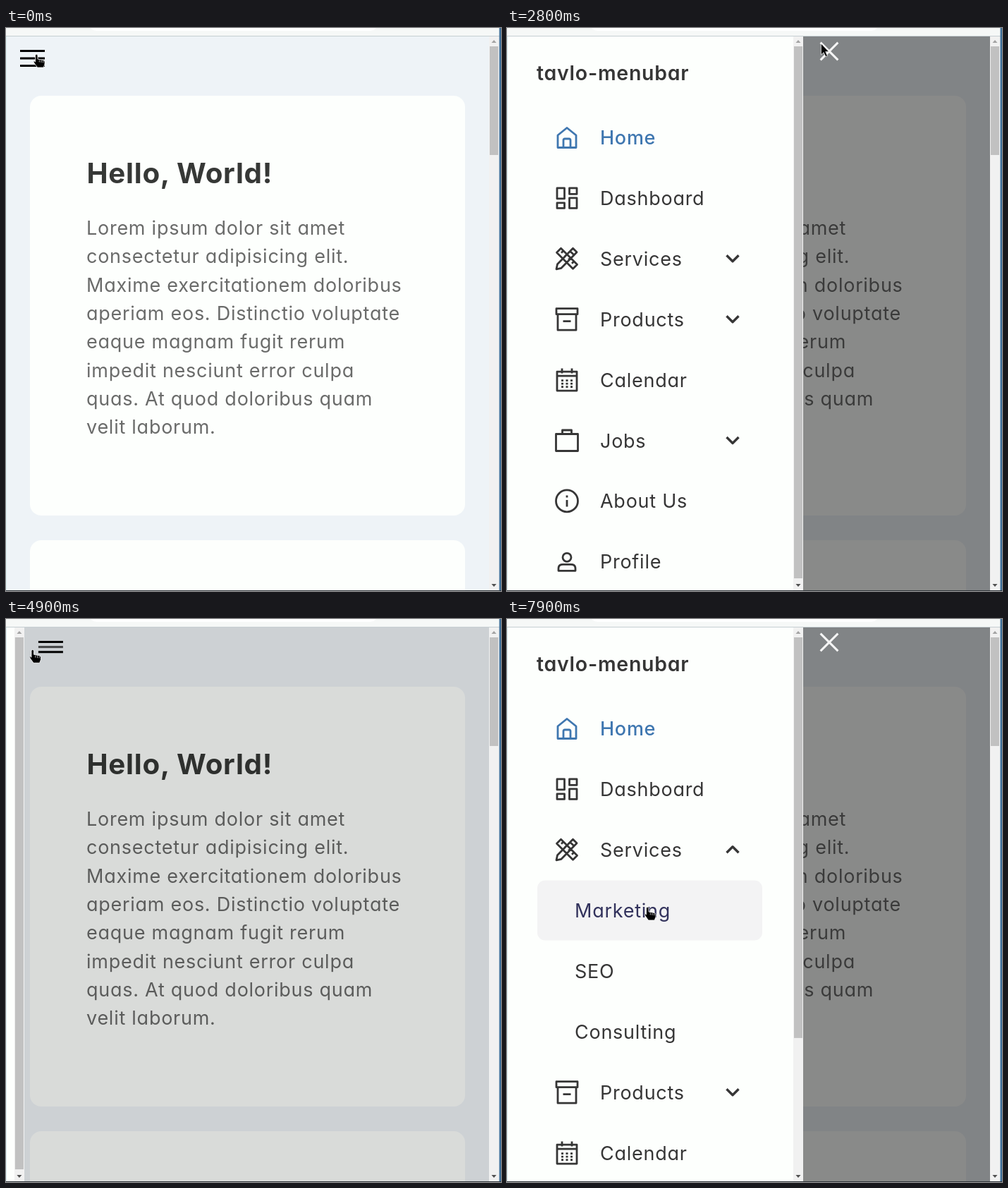
Write an HTML page that moves like this. It is 702x798 px and loops after 8000 ms.

```html
<!DOCTYPE html>
<html lang="en">
<head>
<meta charset="utf-8">
<title>Sidebar demo</title>
<style>
  html, body { margin: 0; width: 100%; height: 100%; overflow: hidden; }
  svg { display: block; }
  text {
    font-family: Inter, "Open Sans", sans-serif;
    font-feature-settings: "cv11";
    letter-spacing: .74px;
    white-space: pre;
  }
  .line { fill: none; stroke: #363636; stroke-width: 2.8; stroke-linejoin: round; }
</style>
</head>
<body>
<script>
const LOOP = 8000, TOP = 12, WIDE = 420, ROW = 85.9, SUB = 258;
const SLIDE = 800, OPEN = 1292, CLOSE = 3010, REOPEN = 4840, EXPAND = 6620;
const INK = [54, 54, 54], HOVER = [50, 50, 92], BLUE = '#3f77b0', WHITE = '#fdfffd';

const clamp = v => Math.max(0, Math.min(1, v));
const span = (t, a, b) => clamp((t - a) / (b - a));
const mix = (a, b, p) => a + (b - a) * p;
const rgb = (a, b, p) => `rgb(${a.map((v, i) => Math.round(mix(v, b[i], p)))})`;

// CSS "ease", solved with a few Newton steps
function ease(x) {
  let u = x;
  for (let i = 0; i < 6; i++) {
    u -= (.75 * u * (1 - u) + u ** 3 - x) / (.75 - 1.5 * u + 3 * u * u);
  }
  return .3 * u * (1 - u) ** 2 + 3 * u * u * (1 - u) + u ** 3;
}

// 0 = closed, 1 = open; each change takes d ms
function opened(t, d, curve = p => p) {
  const part = from => curve(span(t, from, from + d));
  return part(OPEN) - part(CLOSE) + part(REOPEN);
}

function set(node, attrs) {
  for (const k in attrs) node.setAttribute(k, attrs[k]);
  return node;
}
function el(parent, tag, attrs = {}, text) {
  const node = set(document.createElementNS('http://www.w3.org/2000/svg', tag), attrs);
  if (text) node.textContent = text;
  return parent.appendChild(node);
}
const rect = (parent, x, y, width, height, fill, rx = 0) =>
  el(parent, 'rect', { x, y, width, height, fill, rx });
const label = (parent, x, y, text, size, weight, fill) =>
  el(parent, 'text', { x, y, fill, 'font-size': size, 'font-weight': weight }, text);
const move = (node, x, y, extra = '') =>
  node.setAttribute('transform', `translate(${x} ${y}) ${extra}`);

const svg = el(document.body, 'svg', { width: 702, height: 798, viewBox: '0 0 702 798' });

// Page
rect(svg, 0, 0, 702, 798, '#eef3f7');
rect(svg, 34, 96, 617, 595, WHITE, 16);
rect(svg, 34, 726, 617, 200, WHITE, 16);
label(svg, 114.5, 220, 'Hello, World!', 40.3, 700, '#363836');
[
  'Lorem ipsum dolor sit amet',
  'consectetur adipisicing elit.',
  'Maxime exercitationem doloribus',
  'aperiam eos. Distinctio voluptate',
  'eaque magnam fugit rerum',
  'impedit nesciunt error culpa',
  'quas. At quod doloribus quam',
  'velit laborum.'
].forEach((s, i) => label(svg, 114, 293 + i * 40.3, s, 27, 400, '#6a6b6a'));

const shade = rect(svg, 0, TOP, 685, 786, '#000');

// Menu button
const button = el(svg, 'g');
const bars = [0, 1, 2].map(() => rect(button, -17.5, -1.5, 35, 3, '#000'));

// Scrollbars
function scrollbar(parent, x, w) {
  rect(parent, x, TOP, w, 786, '#f1f1f1');
  const thumb = rect(parent, x + 1, 26, w - 2, 154, '#c1c1c1');
  const c = x + w / 2;
  el(parent, 'path', { d: `M${c - 3.5} 21h7l-3.5-4z`, fill: '#a3a3a3' });
  el(parent, 'path', { d: `M${c - 3.5} 788h7l-3.5 4z`, fill: '#505050' });
  return thumb;
}

// Sidebar
const side = el(svg, 'g');
rect(side, 0, TOP, WIDE, 786, WHITE);
label(side, 42, 74, 'tavlo-menubar', 28.5, 600, '#363636');

const icons = {
  Home: 'M-13 14.5V-3L0-13.5L13-3V14.5ZM-5 14V4q0-2 2-2H3q2 0 2 2V14',
  Dashboard: 'M-14-14h10.5v15h-10.5zM3.5-14H14v8.5H3.5zM-14 7h10.5v7.5h-10.5zM3.5 0H14v14.5H3.5z',
  Services: 'M-15 15l1.5-7L8.5-14.5l5.5 5.5L-8 13.5zM4.5-10.5l5.5 5.5' +
    'M-8.5-14.5l-6 6L8.5 14.5l6-6zM-5-11l-3 3M0-6l-3 3M5-1l-3 3M10 4l-3 3',
  Products: 'M-15-15H15v8H-15zM-13-7V15.5H13V-7M-5.5 3H5.5',
  Calendar: 'M-14-11.5H14V15.5H-14zM-14-5.5H14M-7-16v7M7-16v7' +
    'M-8 1h3M-1.5 1h3M5 1h3M-8 5.5h3M-1.5 5.5h3M5 5.5h3M-8 10h3M-1.5 10h3M5 10h3',
  Jobs: 'M-15.5-9H15.5V15H-15.5zM-6.5-9V-14.5H6.5V-9',
  'About Us': 'M-15.5 0a15.5 15.5 0 1 0 31 0a15.5 15.5 0 1 0-31 0M0-1.5V8M0-8v3',
  Profile: 'M-6-6a6 6 0 1 0 12 0a6 6 0 1 0-12 0M-12 13V10q0-6 6-6H6q6 0 6 6V13z'
};
const folding = ['Services', 'Products', 'Jobs'];
const items = {}, chevrons = {};

function item(parent, name, x, y) {
  const box = rect(parent, 43, y - 42.5, 319, 85, '#f3f3f4', 11);
  items[name] = { box, text: label(parent, x, y + 10, name, 27, 400, '#363636') };
  return items[name];
}

const above = el(side, 'g'), below = el(side, 'g');
Object.keys(icons).forEach((name, i) => {
  const group = i < 3 ? above : below;
  const y = 155 + i * ROW;
  const entry = item(group, name, 132, y);
  const icon = el(group, 'path', { class: 'line', d: icons[name] });
  move(icon, 85, y);
  if (name === 'Home') {
    icon.style.stroke = BLUE;
    set(entry.text, { fill: BLUE, 'font-weight': 500 });
  }
  if (folding.includes(name)) {
    chevrons[name] = el(group, 'path', { class: 'line', d: 'M-8.5-4L0 4.5L8.5-4', style: 'stroke-width:3.4' });
    move(chevrons[name], 320, y - .5);
  }
});

const fold = el(side, 'svg', { x: 0, y: 370, width: 406, height: 0, overflow: 'hidden' });
['Marketing', 'SEO', 'Consulting'].forEach((s, i) => item(fold, s, 96, 43 + i * ROW));
const thumb = scrollbar(side, 406, 14);

// Window frame
scrollbar(svg, 685, 14);
rect(svg, 0, 0, 702, 11, '#f6f8f7');
rect(svg, 118, -20, 409, 24, '#fff', 10);
rect(svg, 0, 11, 702, 1, '#c6cfd2');
rect(svg, 0, TOP, 1, 786, '#dcf1f4');
rect(svg, 699.5, 0, 2.5, 798, '#40709a');
rect(svg, 0, 797, 702, 1, '#30353a');

// Pointers
const arrow = el(svg, 'path', {
  d: 'M0 0V16L3.7 12.6L6.5 18.6L9 17.5L6.3 11.6H11z',
  fill: '#000', stroke: '#fff', 'stroke-width': .7
});
const hand = el(svg, 'g');
el(hand, 'path', {
  d: 'M-1.5 1q0-1.8 1.7-1.8T2 1V6l8 1.6q2 .6 2 2.6v3L10.2 18H1.5L-3.5 11q-1-2 .5-2.4L-1.5 10z',
  fill: '#000', stroke: '#fff', 'stroke-width': .8
});
el(hand, 'path', { d: 'M4.3 7.5v3M7 8v3M9.6 8.6v2.6', stroke: '#ddd', 'stroke-width': .8 });

// time, x, y
const path = [
  [0, 43, 38], [300, 39, 42], [1750, 39, 42], [2050, 72, 48], [2800, 445, 22],
  [2950, 454, 30], [3450, 454, 30], [4000, 173, 78], [4600, 38, 44], [4800, 38, 44],
  [5100, 36, 46], [5350, 38, 50], [5650, 220, 330], [5820, 305, 410], [6000, 311, 363],
  [6450, 306, 332], [7420, 306, 332], [7850, 199, 409], [LOOP, 199, 409]
];
const handTimes = [[0, 1400], [2880, 3100], [4560, 4920], [5600, LOOP]];
const hovers = { Products: [5700, 5950], Services: [5970, 7540], Marketing: [7550, 9000] };

// Velocity at a key; zero at both ends and wherever the direction turns
function velocity(i, axis) {
  const a = path[i - 1], b = path[i], c = path[i + 1];
  if (!a || !c || (b[axis] - a[axis]) * (c[axis] - b[axis]) <= 0) return 0;
  return (c[axis] - a[axis]) / (c[0] - a[0]);
}

function along(i, t, axis) {
  const a = path[i - 1], b = path[i], d = b[0] - a[0], p = (t - a[0]) / d, q = 1 - p;
  return a[axis] * q * q * (1 + 2 * p) + b[axis] * p * p * (1 + 2 * q) +
    d * p * q * (velocity(i - 1, axis) * q - velocity(i, axis) * p);
}

function pointer(t) {
  const i = path.findIndex(k => k[0] > t);
  const onLink = handTimes.some(([from, to]) => t >= from && t < to);
  hand.style.display = onLink ? '' : 'none';
  arrow.style.display = onLink ? 'none' : '';
  move(onLink ? hand : arrow, along(i, t, 1), along(i, t, 2));
}

function menu(t) {
  const edge = WIDE * opened(t, SLIDE, ease);
  move(side, edge - WIDE, 0);
  shade.setAttribute('opacity', .46 * opened(t, SLIDE / 4));

  const p = opened(t, SLIDE * .7);
  const gather = span(p, 0, .34), turn = ease(span(p, .36, 1));
  const color = rgb([0, 0, 0], [245, 245, 245], span(p, .15, .9));
  move(button, edge + 37.5 - .5 * turn, 32.5 + .5 * turn);
  bars.forEach((bar, i) => {
    move(bar, 0, i * 10.5 * (1 - gather), `rotate(${(1 - i) * 45 * turn})`);
    bar.setAttribute('fill', color);
  });
  bars[1].setAttribute('opacity', 1 - gather);
}

function submenu(p) {
  const h = SUB * p;
  fold.setAttribute('height', h);
  fold.style.display = h ? '' : 'none';
  move(below, 0, h);
  move(chevrons.Services, 320, 326.3 + p, `rotate(${-180 * p})`);
  thumb.setAttribute('height', 755 * 786 / (787 + h));
}

function draw(t) {
  menu(t);
  submenu(ease(span(t, EXPAND, EXPAND + 500)));
  for (const name in items) {
    const [from, to] = hovers[name] || [LOOP, LOOP];
    const p = span(t, from, from + 200) - span(t, to, to + 200);
    items[name].box.setAttribute('opacity', p);
    if (name !== 'Home') items[name].text.setAttribute('fill', rgb(INK, HOVER, p));
  }
  pointer(t);
}

const start = performance.now();
function tick() {
  draw((performance.now() - start) % LOOP);
  requestAnimationFrame(tick);
}
tick();
</script>
</body>
</html>
```
